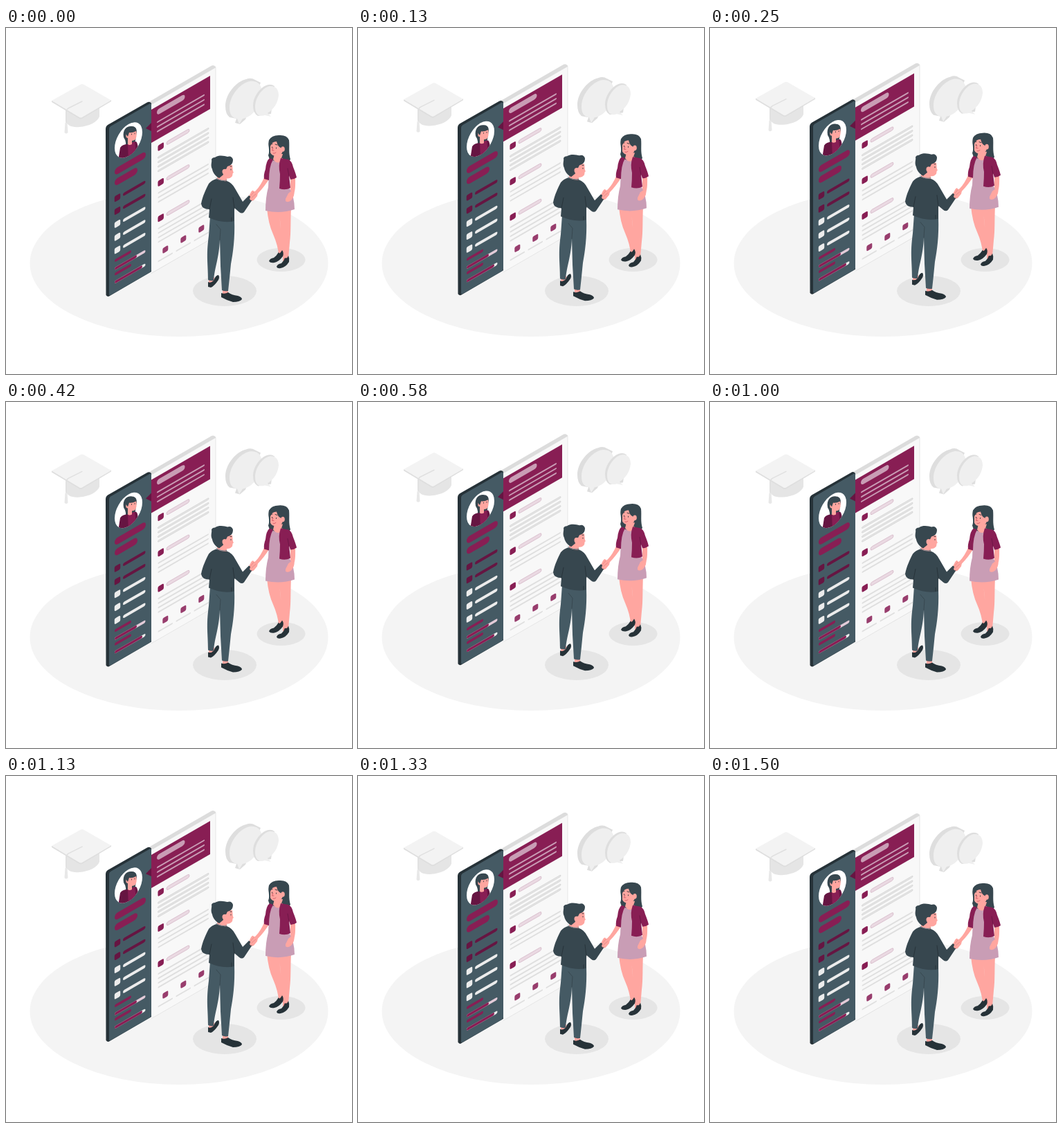
Animation of 500 by 500 pixels, one loop 1.54 s. Source, as an HTML page:

```html
<!DOCTYPE html>
<html lang="en">
<head>
<meta charset="utf-8">
<title>Handshake by a résumé</title>
<style>
  html, body { margin: 0; height: 100%; overflow: hidden; background: #fff; }
  svg { display: block; width: 100%; height: 100%; }
  .plum { fill: #881e54; } .wine { fill: #661542; } .mauve { fill: #c99db5; }
  .skin { fill: #ffa6a0; } .ink { fill: #263238; } .slate { fill: #455a64; } .coat { fill: #37474f; }
  .line { fill: none; stroke-linecap: round; stroke-linejoin: round; }
</style>
</head>
<body>
<svg viewBox="0 0 500 500">
  <ellipse cx="250" cy="340" rx="215.500" ry="106" fill="#f4f4f4"/>
  <g fill="#e5e5e5">
    <ellipse cx="316" cy="380" rx="46" ry="22"/>
    <ellipse cx="397.500" cy="335" rx="35" ry="17"/>
  </g>

  <g id="float">
    <g id="cap">
      <path fill="#e5e5e5" d="M86 114V134C88 141 96 144 106 143C120 142 132 136 135 128V110Z"/>
      <path fill="#dedede" d="M66 105V107L106 131Q108 132 110 131L152 106V104Z"/>
      <path fill="#f3f3f3" d="M66 105L108 81.500Q110 80.500 112 81.500L152 104.500L110 129Q108 130 106 129Z"/>
      <path class="line" stroke="#e0e0e0" stroke-width="1.500" d="M110 106L90 116Q87 118 87 122V137"/>
      <path fill="#e8e8e8" d="M85.500 137H88.500L89.500 151Q87 154 84.500 151Z"/>
    </g>

    <g id="bubbles">
      <path fill="#dedede" d="M317 113C317 95 333 77 347 74Q354 71 360 75L368 79L346 132L338 139L331 137L333 131L323 129Q317 124 317 113Z"/>
      <path fill="#efefef" d="M323 115C323 98 338 80 352 77C365 75 371 84 370 97C368 114 355 129 342 131L337 139L334 131C326 130 323 124 323 115Z"/>
      <path fill="#dedede" d="M357 112C357 98 369 84 379 82Q384 81 388 84L383 124L364 127Q357 123 357 112Z"/>
      <path fill="#efefef" d="M360 114C360 100 371 86 381 84C390 83 394 89 394 97C393 109 386 118 378 123L383 128L374 126C365 129 360 124 360 114Z"/>
    </g>

    <path fill="#dcdcdc" d="M207 106.500L297 54.500Q300 53 303 56V62L210 114Z"/>
    <path class="ink" d="M144 146Q144 142 147 140L204 107.500Q207 105.500 210 108.500V352L150 387Q147 389.500 144.500 386Z"/>
    <g id="sheet" transform="matrix(1 -.577 0 1 210 111)">
      <rect width="93" height="243.500" fill="#f8f8f8"/>
      <path d="M0 243.500H93V0" class="line" stroke="#e0e0e0" stroke-width=".8"/>
      <rect x="-61" y="-3" width="61" height="244" rx="2.500" class="slate"/>
      <rect y="7" width="85" height="48" class="plum"/>
      <path class="wine" d="M0 26L-8 29.500L0 38Z"/>
      <ellipse cx="-33" cy="32" rx="20" ry="23" fill="#fff"/>
    </g>

    <clipPath id="portrait">
      <ellipse cx="-33" cy="32" rx="20" ry="23" transform="matrix(1 -.577 0 1 210 111)"/>
    </clipPath>
    <g clip-path="url(#portrait)">
      <path class="coat" d="M170 158C168 146 175 141 182 142C189 142 190 149 188 155L186 170L172 174Q175 165 170 158Z"/>
      <path class="wine" d="M162 192L165 173Q168 168 176 168L188 164Q192 167 191 190Z"/>
      <path class="plum" d="M177 192L176 168L186 164L189 190Z"/>
      <path class="skin" d="M174 152L183 149L188 148Q190 158 186 162L182 163V168Q178 170 176 168V159Q172 159 174 152Z"/>
      <path class="coat" d="M173 153Q174 144 182 143Q189 143 188 149Q182 152 178 151L176 157Z"/>
      <path class="line" stroke="#263238" stroke-width=".8" d="M181.500 153V154M186 152V153"/>
    </g>

    <g id="man">
      <path class="skin" d="M293 360H301V370H293ZM313 376H321V386H313Z"/>
      <path class="ink" d="M292 374V367Q296 369 300 365Q303 357 307 357Q309 360 307 364Q301 373 296 375Z
        M311 389V383Q316 385 321 382Q326 386 335 387Q341 389 341 392Q338 396 328 396Q320 394 311 389Z"/>
      <path class="slate" d="M295 272L330 277C331 305 328 325 325 341Q323 362 321 380Q316 381 312 379L310 344L309 306C308 332 302 344 300 365Q296 366 292 364C292 340 289 330 293 300Z"/>
      <path class="line" stroke="#37474f" stroke-width=".9" d="M309 306L310 291L304 284"/>
      <path class="skin" d="M305 209H319V222Q311 225 305 219Z"/>
      <path class="skin" d="M307 198H327C328 205 328 210 327 214Q323 219 317 217Q308 217 307 207Z"/>
      <path class="skin" d="M326 203L329 209L327 210Z"/>
      <path class="coat" d="M298 204C295 198 298 194 297 190Q298 187 302 187C308 183 316 185 320 186Q326 184 328 190C328 197 324 199 320 200L318 204Q314 203 313 207L314 212L308 217C304 215 299 210 298 204Z"/>
      <ellipse class="skin" cx="315.500" cy="207.500" rx="3" ry="3.600"/>
      <path class="line" stroke="#263238" stroke-width=".9" d="M324 200L326 200M325 204V205"/>
      <path class="skin" d="M350 245L354 237Q357 233 358 236L364 238L363 243L358 249Q354 251 350 250Z"/>
      <path class="coat" d="M304 218Q311 222 319 221Q327 224 331 232L342 251L351 242Q355 244 356 248L344 266Q341 269 337 266L330 260V279Q313 283 293 274L294 262Q283 262 282 254C284 243 289 233 293 225Q297 220 304 218Z"/>
      <path class="line" stroke="#71808a" stroke-width="1" d="M304 217Q311 222 319 220"/>
      <path class="line" stroke="#263238" stroke-width=".9" d="M294 262L297 247M330 261L328 245M326 274V279"/>
    </g>

    <g id="woman">
      <path class="skin" d="M377 260H395C395 280 399 300 400 323L394 328Q393 314 386 298Q379 283 377 260Z
        M394 260H412C411 278 412 296 410 310L408 333L400 337L400 323C398 302 397 285 394 260Z"/>
      <path class="ink" d="M380 337Q381 333 387 332Q391 329 394 324Q395 328 399 321Q402 325 400 330Q394 338 388 339Q382 340 380 337Z
        M391 345Q392 341 398 340Q402 336 403 332Q406 334 408 329Q410 333 409 338Q404 346 397 347Q392 348 391 345Z"/>
      <path class="coat" d="M379 184C382 178 378 169 380 162Q384 155 394 155Q406 154 409 162C410 172 408 180 411 190L400 201L382 193Z"/>
      <path class="skin" d="M374 214L381 217Q373 230 364 239L358 247Q354 251 352 247L354 241L361 235Q368 228 374 214Z"/>
      <path class="skin" d="M411 215L418 213C418 224 419 234 415 242Q412 251 406 252Q403 251 403 247L405 240L411 234Z"/>
      <path class="mauve" d="M381 189Q390 196 397 188L408 193L409 230Q417 244 417 262Q397 269 375 264Q375 245 379 230Z"/>
      <path class="skin" d="M388 182H400V190Q393 199 386 190Z"/>
      <path class="skin" d="M382 166Q390 161 400 166C402 180 398 184 391 185Q384 185 382 180Z"/>
      <path class="coat" d="M380 172Q378 160 388 157Q405 153 407 170L408 190L398 188Q403 177 397 173Q393 172 391 164Q384 164 382 171Z"/>
      <ellipse class="skin" cx="400" cy="175" rx="2.800" ry="3.800"/>
      <path class="line" stroke="#263238" stroke-width=".9" d="M383 168L385 167.500M389 168L392 169M384.500 172V173M390.500 173V174"/>
      <path class="line" stroke="#d45b68" stroke-width=".9" d="M386 173L384.500 177H387M386 181Q388 182 390 180"/>
      <path class="plum" d="M381 188L386 190Q380 200 380 220L373 218Q372 212 375 204Q376 192 381 188Z
        M397 188L408 190Q413 192 415 201Q419 211 420 216Q416 219 411 219L409 213L411 231Q404 235 395 232Q396 221 396 211Q393 199 397 188Z"/>
      <path class="line" stroke="#661542" stroke-width=".8" d="M409 214L407 203"/>
      <path class="skin" d="M404 247L408 239Q412 235 416 236Q418 242 412 249Q407 253 404 250Z"/>
      <path class="line" stroke="#e0817f" stroke-width=".7" d="M354 242L358 237M355 245L361 240"/>
    </g>
  </g>
</svg>
<script>
const sheet = document.getElementById("sheet");
const float = document.getElementById("float");
const PLUM = "#881e54", WINE = "#661542", MAUVE = "#c99db5", GREY = "#dfdfdf", PALE = "#ececec";

// A rounded bar in sheet coordinates, centred on height y.
function bar(x1, x2, y, size, fill, radius = size / 2, outline = "none") {
  const rect = document.createElementNS("http://www.w3.org/2000/svg", "rect");
  const attributes = { x: x1, y: y - size / 2, width: x2 - x1, height: size, rx: radius, fill, stroke: outline, "stroke-width": .6 };
  for (const name in attributes) rect.setAttribute(name, attributes[name]);
  sheet.append(rect);
}
const icon = (x, y, fill, size = 8.5) => bar(x - size / 2, x + size / 2, y, size, fill, 2);

// Side column
bar(-53, -8, 67, 10, PLUM);
bar(-53, -20, 82.500, 10, PLUM);
for (let i = 0; i < 5; i++) {
  const y = 106 + 18.800 * i, fill = i < 2 ? WINE : PALE;
  icon(-49, y, fill);
  bar(-41, -8.500, y + .4, 4.500, fill);
}
bar(-53, -29, 195, 4, PLUM);
bar(-53, -8.500, 206.500, 4, "#e3cbd8");
bar(-53, -21, 206.500, 4, PLUM);
bar(-53, -29, 214.500, 4, PLUM);
bar(-53, -8.500, 226, 4, PALE);
bar(-53, -13, 226, 4, PLUM);

// Header
bar(8, 48.500, 16, 8, MAUVE);
for (const y of [30, 36.800, 43.600]) bar(8, 77, y, 2.200, MAUVE);

// Sections
[4, 3, 4].forEach((count, section) => {
  const top = 68.500 + 51.300 * section;
  icon(13.700, top, PLUM);
  bar(22, 55, top, 5, "#ead9e2", 2.500, "#cfafc0");
  for (let i = 0; i < count; i++)
    bar(9.500, 83, top + 13.500 + 6.500 * i, 2.200, section ? GREY : "#e9e9e9", 1.100, section ? "none" : "#c9c9c9");
});
for (let i = 0; i < 3; i++) {
  icon(20.300 + 26 * i, 220.700, "#983d6d", 8);
  bar(9.500 + 26 * i, 31 + 26 * i, 232, 2, GREY);
}

// Everything above the floor rises and sinks 10 units at a steady speed, 24 poses a second.
const LOOP = 1540, PERIOD = 1500, LEAD = 40, RATE = 24;
function draw(now) {
  const time = Math.floor(((now % LOOP) + 5) * RATE / 1000) * 1000 / RATE;
  const phase = ((time + LEAD) / PERIOD) % 1;
  const lift = 10 * (1 - Math.abs(1 - 2 * phase));
  float.setAttribute("transform", `translate(0 ${(.53 - lift).toFixed(2)})`);
  requestAnimationFrame(draw);
}
const start = performance.now();
draw(0);
function loop() { draw(performance.now() - start); }
</script>
</body>
</html>
```
